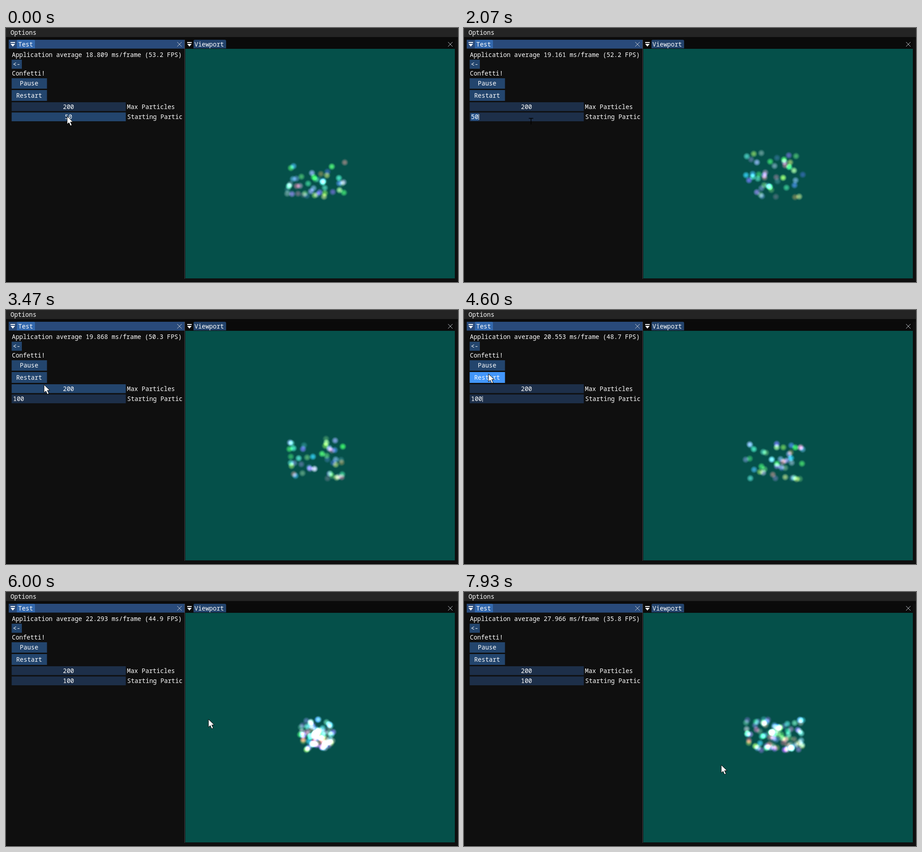
Animation, 998 px wide and 561 px high, one loop 8000 ms. Source, as an HTML page with a canvas:

```html
<!DOCTYPE html>
<html lang="en">
<head>
<meta charset="utf-8">
<title>Confetti particles</title>
<style>
  html, body { margin: 0; width: 100%; height: 100%; overflow: hidden; background: #0f0f0f; }
  canvas, svg { position: absolute; left: 0; top: 0; display: block; }
  canvas { left: 396px; top: 46px; }
  text { font: 13.6px "Noto Sans Mono", "DejaVu Sans Mono", monospace; fill: #fff; white-space: pre; }
  .mid { text-anchor: middle; }
  .btn { fill: #23456d; }
  .field { fill: #1d2f49; }
  .close { stroke: #c4c8cf; stroke-width: 1; fill: none; }
</style>
</head>
<body>
<canvas id="view" width="595" height="507"></canvas>
<svg width="998" height="561" viewBox="0 0 998 561">
  <defs>
    <path id="fold" d="M0 0h10v2h-10zM0 4h10l-5 6z" fill="#fff"/>
    <path id="cross" class="close" d="M-5-5L5 5M5-5L-5 5"/>
  </defs>
  <rect width="998" height="20" fill="#242424"/>
  <rect y="20" width="998" height="6" fill="#0b0b0b"/>
  <rect x="396" y="26" width="595" height="20" fill="#0a0a0a"/>
  <rect x="6" y="26" width="388" height="19.5" fill="#294a7a"/>
  <path d="M24 45V29q0-3 3-3h34q3 0 3 3v16z" fill="#3368ad"/>
  <path d="M414 45V29q0-3 3-3h66q3 0 3 3v16z" fill="#23436c"/>
  <rect x="394" y="26" width="1" height="528" fill="#45454d"/>
  <rect y="560" width="998" height="1" fill="#000"/>
  <use href="#fold" x="10" y="31"/>
  <use href="#fold" x="400" y="31"/>
  <use href="#cross" x="383" y="36"/>
  <use href="#cross" x="981" y="36"/>

  <text x="10" y="15">Options</text>
  <text x="27" y="41">Test</text>
  <text x="416" y="41">Viewport</text>
  <text id="stats" x="13" y="64"></text>

  <rect class="btn" x="12.5" y="70" width="22.5" height="20"/>
  <text class="mid" x="23.5" y="85">&lt;-</text>
  <text x="13" y="105">Confetti!</text>
  <rect class="btn" x="12.5" y="111" width="78" height="23"/>
  <text class="mid" x="51" y="127">Pause</text>
  <rect id="restart" class="btn" x="12.5" y="137" width="78" height="24"/>
  <text class="mid" x="51" y="154">Restart</text>

  <rect id="maxRow" class="field" x="12.5" y="164" width="252" height="19.5"/>
  <text class="mid" x="138" y="179">200</text>
  <text x="267" y="179">Max Particles</text>
  <rect id="startRow" class="field" x="12.5" y="186.500" width="252" height="19.5"/>
  <rect id="selection" x="15" y="188.500" width="17" height="16" fill="#2a5890"/>
  <text id="startValue" y="201"></text>
  <rect id="caret" y="190" width="1" height="13" fill="#fff"/>
  <text x="267.5" y="201">Starting Partic</text>

  <path id="arrow" d="M0 0V17.5L4 14 7.2 21 10.5 19.5 7.3 12.7H13Z" fill="#fff" stroke="#000"/>
  <path id="beam" d="M-5-5.5H5M0-5V8" stroke="#000" stroke-width="1.5" fill="none"/>
</svg>
<script>
const LOOP = 8000, STEPS = 120;
const EDIT = 20, TYPE = 35, RESTART = 80;
const $ = id => document.getElementById(id);
const ctx = $('view').getContext('2d');

// Key points: step, then the values reached at that step.
const FRAME_MS = [[0, 18.809], [11, 19.487], [31, 19.161], [52, 19.868],
  [69, 20.553], [90, 22.293], [119, 27.966]];
const CURSOR = [[15, 135, 195], [19, 148, 205], [40, 148, 205], [52, 84, 165],
  [59, 54, 141], [81, 54, 141], [90, 447, 281], [115, 568, 382]];

function track(points, step) {
  const next = points.findIndex(point => point[0] > step);
  if (next === 0) return points[0].slice(1);
  if (next < 0) return points.at(-1).slice(1);
  const a = points[next - 1], b = points[next];
  const p = (step - a[0]) / (b[0] - a[0]);
  return a.slice(1).map((v, i) => v + (b[i + 1] - v) * p);
}

let seed = 29;
const random = () => (seed = seed * 16807 % 2147483647) / 2147483647;

const RADIUS = 8.5;
function glow() {
  const sprite = document.createElement('canvas');
  sprite.width = sprite.height = RADIUS * 2;
  const c = sprite.getContext('2d');
  const rgb = [40 + random() * 130, 30 + random() * 140, 20 + random() * 170].map(Math.round);
  const strength = .6 + .4 * random();
  const fill = c.createRadialGradient(RADIUS, RADIUS, 0, RADIUS, RADIUS, RADIUS);
  for (let r = 0; r <= 1; r += .25) {
    fill.addColorStop(r, `rgba(${rgb},${strength * (1 - r * r) ** 1.3})`);
  }
  c.fillStyle = fill;
  c.fillRect(0, 0, RADIUS * 2, RADIUS * 2);
  return sprite;
}

// Positions run from 0 to 1 inside the cloud's box.
function particle(u, v, speed) {
  const angle = random() * Math.PI * 2;
  return { u, v, du: Math.cos(angle) * speed / 130, dv: Math.sin(angle) * speed / 100, sprite: glow() };
}

const opening = Array.from({ length: 46 }, () =>
  particle(random(), random() ** .5, 1 + random() * 3));
const burst = Array.from({ length: 95 }, () =>
  particle(.5, .48, 5.5 * random() ** .7));

function bounce(u) {
  u = ((u % 2) + 2) % 2;
  return u > 1 ? 2 - u : u;
}

function drawParticles(step) {
  const restarted = step >= RESTART;
  const age = restarted ? step - RESTART : step;
  // The burst slows down and flattens; the opening cloud rises a little and settles.
  const travel = restarted ? 16 * (1 - Math.exp(-age / 16)) : age;
  const top = restarted ? 268 + age / 3 : 290 - 14 * Math.sin(age / 20);
  const bottom = restarted ? 370 - age / 2 : 374;

  ctx.globalCompositeOperation = 'source-over';
  ctx.fillStyle = '#05504a';
  ctx.fillRect(0, 0, 595, 507);
  ctx.globalCompositeOperation = 'lighter';
  for (const p of restarted ? burst : opening) {
    const x = 621 + 127 * bounce(p.u + p.du * travel);
    const y = top + (bottom - top) * bounce(p.v + p.dv * travel);
    ctx.drawImage(p.sprite, x - 396 - RADIUS, y - 46 - RADIUS);
  }
}

const show = (id, on) => $(id).setAttribute('visibility', on ? 'visible' : 'hidden');

function drawPanel(step) {
  const [ms] = track(FRAME_MS, step);
  $('stats').textContent =
    `Application average ${ms.toFixed(3)} ms/frame (${(1000 / ms).toFixed(1)} FPS)`;

  const [x, y] = track(CURSOR, step);
  const editing = step >= EDIT && step < RESTART;
  const over = (right, top, bottom) => x > 12 && x < right && y >= top && y <= bottom;
  const onStart = over(264, 186, 206);
  const pressed = step === RESTART - 1;
  $('restart').style.fill = over(90, 137, 161) ? (pressed ? '#0f87fa' : '#4296fa') : '';
  $('maxRow').style.fill = over(264, 164, 183) ? '#23456d' : '';
  $('startRow').style.fill = onStart && !editing ? '#23456d' : '';

  const typed = Math.max(0, Math.ceil((step - TYPE + 1) / 2));
  const value = typed ? '100'.slice(0, typed) : '50';
  $('startValue').textContent = value;
  $('startValue').setAttribute('x', editing ? 15.5 : 138);
  $('startValue').setAttribute('class', editing ? '' : 'mid');
  show('selection', editing && !typed);
  $('caret').setAttribute('x', 16 + value.length * 8.16);
  show('caret', editing && (step - EDIT) % 18 < 14);

  const beam = editing && onStart;
  show('beam', beam);
  show('arrow', !beam);
  for (const id of ['arrow', 'beam']) $(id).setAttribute('transform', `translate(${x} ${y})`);
}

let begin, last = -1;
function tick(now) {
  begin ??= now;
  const time = Math.max(0, now - begin) % LOOP;
  const step = Math.min(STEPS - 1, Math.floor((time + 4) * STEPS / LOOP));
  if (step !== last) {
    last = step;
    drawParticles(step);
    drawPanel(step);
  }
  requestAnimationFrame(tick);
}
tick(performance.now());
</script>
</body>
</html>
```
